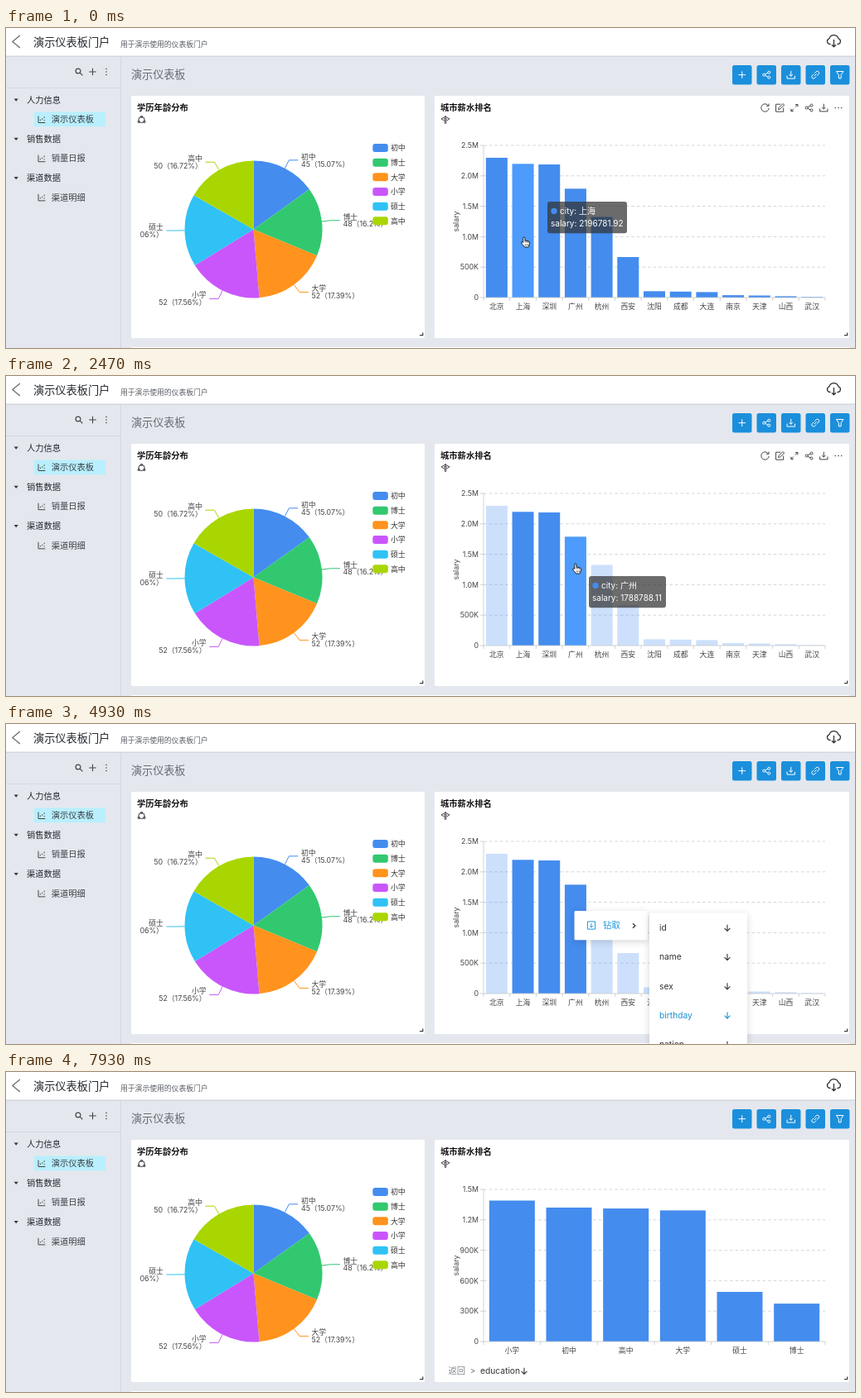
These frames come from a looping animation (1024 px wide and 387 px high, 7990 ms). An HTML page:

```html
<!DOCTYPE html>
<html lang="zh">
<head>
<meta charset="utf-8">
<title>演示仪表板</title>
<style>
html, body { margin: 0; width: 100%; height: 100%; overflow: hidden; background: #e4e8ee; }
svg { display: block; width: 1024px; height: 387px; font-family: Inter, "Noto Sans CJK SC", "Noto Sans CJK", sans-serif; }
.shadow { filter: drop-shadow(0 2px 4px rgba(0, 0, 0, .16)); }
</style>
</head>
<body>
<svg id="stage" viewBox="0 0 1024 387" xmlns="http://www.w3.org/2000/svg"></svg>
<script>
const LOOP = 7990, STEPS = 120;
const BLUE = '#448cee', BRIGHT = '#4c9bfd', INK = '#23272e', GREY = '#555a61', LINK = '#1a90cf';
const AXIS = { left: 576, right: 988, top: 142, base: 326 };
const CLICKS = { 1: 370, 2: 1250, 3: 2300 };
const MENU_OPEN = 3700, SUB_OPEN = 3930, MENU_CLOSE = 5680, DRILL = 5750;

// ---- markup helpers; text is placed by its vertical middle
const rect = (x, y, w, h, fill, extra = '') =>
  `<rect x="${x}" y="${y}" width="${w}" height="${h}" fill="${fill}" ${extra}/>`;
const line = (d, color, w = 1, extra = '') =>
  `<path d="${d}" fill="none" stroke="${color}" stroke-width="${w}" ${extra}/>`;
const text = (x, y, s, size = 10.25, fill = INK, extra = '') =>
  `<text x="${x}" y="${y + size * .36}" font-size="${size}" fill="${fill}" ${extra}>${s}</text>`;
const icon = (x, y, name, color = '#3b3f45', w = 1) =>
  line(ICONS[name], color, w, `transform="translate(${x} ${y})" stroke-linejoin="round"`);
const group = (id, body, extra = '') => `<g id="${id}" ${extra}>${body}</g>`;
const MIDDLE = 'text-anchor="middle"', END = 'text-anchor="end"', BOLD = 'font-weight="600"';

const ring = (x, y, r) => `M${x - r} ${y}a${r} ${r} 0 1 0 ${2 * r} 0a${r} ${r} 0 1 0 ${-2 * r} 0`;
const ICONS = {
  back: 'M4.5-7.5L-4.5 0L4.5 7.5',
  cloud: 'M-4 4H-5a3.4 3.4 0 0 1-.6-6.6a5.8 5.8 0 0 1 11.2 0a3.4 3.4 0 0 1-.6 6.6H4M0-1.5V7M-2.5 4.7L0 7.2L2.5 4.7',
  search: ring(-1, -1, 2.9) + 'M1.2 1.2L4.3 4.3',
  plus: 'M-4.3 0H4.3M0-4.3V4.3',
  share: ring(-3, 0, 1.5) + ring(3, -3, 1.5) + ring(3, 3, 1.5) + 'M-1.6-.7L1.6-2.4M-1.6 .7L1.6 2.4',
  download: 'M-4.7 1V4.4H4.7V1M0-4.8V1.6M-2.2-.6L0 1.6L2.2-.6',
  link: 'M-1-2L.8-3.8a2.1 2.1 0 0 1 3 3L2 1M1 2L-.8 3.8a2.1 2.1 0 0 1-3-3L-2-1M-1.4 1.4L1.4-1.4',
  filter: 'M-4.2-4.2H4.2L1.4 0V4.2H-1.4V0Z',
  chart: 'M-4-4V4H4.4M-1.6 1.6v-1.6M.8 .4v-1.6M3.2-1.6v-1.6M3.2 1.8v-1.2',
  refresh: 'M4-2.5A4.7 4.7 0 1 0 4.7 .5M4.5-5V-2.2H1.6',
  edit: 'M1-4.3H-4.6V4.7H4.5V0M-1.6 2L-1.2 0L3.8-5L5.4-3.4L.4 1.6Z',
  expand: 'M1-1L4-4M1.2-4H4V-1.2M-1 1L-4 4M-4 1.2V4H-1.2',
  arrow: 'M0-3.8V3.6M-3.4 .4L0 3.8L3.4 .4',
  chevron: 'M-1.5-2.8L1.5 0L-1.5 2.8',
  drill: 'M-4.6-4.6H4.6V4.6H-4.6ZM0-2.4V2.2M-1.8 .6L0 2.4L1.8 .6',
  ring: ring(0, 0, 3.6) + ring(0, -3.6, 1.1) + ring(-3.4, 2.4, 1.1) + ring(3.4, 2.4, 1.1),
  cross: 'M-5-.6L0-3.4L5-.6L0 2.4ZM0-4.6V5M-2-.6H2M-1.6 3.6L0 5L1.6 3.6'
};

// ---- static page
function page() {
  let s = rect(0, 0, 1024, 387, '#e4e8ee');
  s += rect(0, 33, 1024, 2, '#d3d7dd') + rect(0, 0, 1024, 33.5, '#fff');
  s += icon(12.3, 16.5, 'back', '#666', 1.1) + text(33, 17.5, '演示仪表板门户', 13.2)
    + text(138, 19.5, '用于演示使用的仪表板门户', 8.8, GREY) + icon(998.5, 15.5, 'cloud', '#333', 1.3);

  s += rect(138, 35, 1, 352, '#d3d8df') + rect(0, 72, 138, 1, '#d3d8df');
  s += icon(88, 53, 'search', '#444', 1.2) + icon(104.5, 53, 'plus', '#444', 1.1);
  for (const y of [49.5, 53, 56.5]) s += `<circle cx="121" cy="${y}" r=".8" fill="#444"/>`;
  s += rect(34, 101.5, 86, 17.7, '#b9effe');
  [['人力信息', '演示仪表板'], ['销售数据', '销量日报'], ['渠道数据', '渠道明细']].forEach(([head, item], i) => {
    const y = 87 + i * 47.2;
    s += `<path d="M9.6 ${y - 1.4}h5.2l-2.6 3.2z" fill="#333"/>`
      + text(25, y, head, 10.25, INK, 'font-weight="500"')
      + icon(43, y + 23.5, 'chart', '#444') + text(54.7, y + 23.5, item, 10.25, '#3a3f46');
  });

  s += text(151, 56.5, '演示仪表板', 13.1, '#666b73');
  ['plus', 'share', 'download', 'link', 'filter'].forEach((name, i) => {
    const x = 876 + i * 29.5;
    s += rect(x, 45, 23.5, 23.5, '#1b8fdc', 'rx="2.5"') + icon(x + 11.75, 56.7, name, '#fff');
  });

  for (const [x, w] of [[151, 354], [517, 500]]) {
    s += rect(x, 82, w, 293, '#fff', 'rx="2"')
      + line(`M${x + w - 2.3} 368.5V371.6H${x + w - 6}`, '#444', 1.3);
  }
  s += rect(151, 386, 866, 1, '#fff');
  s += text(158, 96.5, '学历年龄分布', 10.3, '#111', BOLD) + icon(163.5, 111, 'ring', '#333');
  s += text(524, 96.5, '城市薪水排名', 10.3, '#111', BOLD) + icon(530, 110.5, 'cross', '#333', .9);
  return s;
}

function pie() {
  const cx = 298.5, cy = 243.5, r = 83;
  const parts = [
    ['初中', 45, 15.07, BLUE], ['博士', 48, 16.2, '#32c870'], ['大学', 52, 17.39, '#ff931e'],
    ['小学', 52, 17.56, '#c956fb'], ['硕士', 51, 17.06, '#30c2f5'], ['高中', 50, 16.72, '#a9d600']
  ];
  const polar = (p, d) => [cx + d * Math.sin(p * Math.PI / 50), cy - d * Math.cos(p * Math.PI / 50)];
  let sum = 0, slices = '', labels = '', legend = '';
  parts.forEach(([name, count, share, color], i) => {
    const mid = sum + share / 2, side = mid < 50 ? 1 : -1;
    const [x, y] = polar(mid, r + 11), end = x + side * 11;
    slices += `<path d="M${cx} ${cy}L${polar(sum, r)}A${r} ${r} 0 0 1 ${polar(sum + share, r)}Z" fill="${color}"/>`;
    labels += line(`M${polar(mid, r)}L${x} ${y}H${end}`, color);
    [name, `${count}（${share}%）`].forEach((s, row) => {
      labels += text(end + side * 3.6, y - 4.3 + row * 8.8, s, 8.8, '#444', side < 0 ? END : '');
    });
    const ly = 145 + i * 17.66;
    legend += rect(442.3, ly - 5, 18.5, 10, color, 'rx="3"') + text(464, ly, name, 8.9, '#333');
    sum += share;
  });
  return `<clipPath id="card"><rect x="162" y="120" width="340" height="250"/></clipPath>`
    + `<g clip-path="url(#card)">${slices}${labels}${legend}</g>`;
}

// ---- bar charts
const cities = {
  id: 'cities', max: 2500, width: 26, ticks: ['0', '500K', '1.0M', '1.5M', '2.0M', '2.5M'],
  names: '北京 上海 深圳 广州 杭州 西安 沈阳 成都 大连 南京 天津 山西 武汉'.split(' '),
  values: [2297, 2197, 2187, 1789, 1325, 666, 104, 98, 90, 39, 34, 22, 9]
};
const degrees = {
  id: 'degrees', max: 1500, width: 55, ticks: ['0', '300K', '600K', '900K', '1.2M', '1.5M'],
  names: '小学 初中 高中 大学 硕士 博士'.split(' '),
  values: [1390, 1321, 1312, 1293, 490, 374]
};

function barChart({ id, max, width, ticks, names, values }) {
  const { left, right, top, base } = AXIS, pitch = (right - left) / names.length;
  let s = '', bars = '', marks = '';
  ticks.forEach((label, i) => {
    const y = base - i * (base - top) / 5;
    if (i) s += line(`M${left} ${y}H${right}`, '#cfd2d6', .9, 'stroke-dasharray="3.6 3"');
    marks += `M${left - 4} ${y}H${left}`;
    s += text(570, y, label, 8.8, '#444', END);
  });
  names.forEach((name, i) => {
    const x = left + pitch * (i + .5), h = values[i] / max * (base - top);
    bars += rect(x - width / 2, base - h, width, h, BLUE);
    marks += `M${left + pitch * i} ${base}v4`;
    s += text(x, 336.5, name, 8.8, '#444', MIDDLE);
  });
  marks += `M${right} ${base}v4M${left} ${top}V${base}H${right}`;
  s += group(id + 'Bars', bars) + line(marks, '#c4c8cd', .8);
  s += text(0, 0, 'salary', 8.8, '#444', `${MIDDLE} transform="translate(543 234) rotate(-90)"`);
  return group(id, s);
}

const crumbs = () => group('crumbs', text(533.5, 361.5, '返回', 10.25, '#80858c')
  + text(560, 361.5, '&gt;', 9.5, '#666') + text(572, 361.5, 'education', 10.25, '#333')
  + icon(625, 361.5, 'arrow', '#333', 1.1));

// ---- overlays
function tools() {
  let s = '';
  ['refresh', 'edit', 'expand', 'share', 'download'].forEach((name, i) => {
    s += icon(915.5 + i * 17.7, 96.5, name, '#444');
  });
  for (const x of [1000.3, 1004, 1007.7]) s += `<circle cx="${x}" cy="96.5" r=".8" fill="#444"/>`;
  return group('tools', s);
}

const tooltip = () => group('tip',
  rect(0, 0, 96, 38.3, 'rgba(50,50,50,.72)', 'rx="3" id="tipBox"')
  + `<circle cx="8" cy="11.4" r="3.7" fill="${BLUE}"/>`
  + text(15, 11.4, '', 10, '#fff', 'id="tipCity"') + text(4, 26.8, '', 10, '#fff', 'id="tipPay"'));

const FIELDS = ['id', 'name', 'sex', 'birthday', 'nation'];
function menus() {
  const drill = rect(685.5, 226, 88.5, 35.3, '#fff', 'rx="1.5" class="shadow"')
    + group('drillItem', icon(706, 243.5, 'drill', 'currentColor') + text(720, 243.7, '钻取', 10.4, 'currentColor'))
    + icon(757.5, 244, 'chevron', '#333', 1.2);
  let sub = rect(776, 228.5, 118, 190, '#fff', 'rx="1.5" class="shadow"');
  FIELDS.forEach((name, i) => {
    const y = 246.5 + i * 35.25;
    sub += group('field' + i, text(788, y, name, 10.25, 'currentColor') + icon(870, y, 'arrow', 'currentColor', 1.1));
  });
  return group('menu', drill) + group('submenu', sub);
}

const hand = () => group('hand',
  `<path d="M-1.2 6.3V1a1.1 1.1 0 0 1 2.2 0V4l4 .8q1.8.4 1.5 2.2l-.6 3q-.3 1.4-.8 2H.6q-2-2.6-4-5q-.2-1.6 1.2-1.3z" fill="#fff" stroke="#111" stroke-width=".9" stroke-linejoin="round"/>`
  + line('M1 4.2V6.6M2.8 4.6V6.8M4.6 5V7M1.2 8.4v2M2.8 8.4v2M4.4 8.4v2', '#111', .6));

document.getElementById('stage').innerHTML = page() + pie() + barChart(cities) + barChart(degrees)
  + crumbs() + tools() + tooltip() + menus() + hand();

// ---- timeline
const $ = id => document.getElementById(id);
const show = (id, on) => $(id).style.display = on ? '' : 'none';
const ramp = (t, start, dur) => Math.min(1, Math.max(0, (t - start) / dur));
const easeOut = u => 1 - (1 - u) ** 3;
const easeInOut = u => u * u * (3 - 2 * u);

const HAND = [[0, 625, 253], [590, 625, 253], [820, 656, 231], [1540, 656, 231], [1720, 687, 227],
  [2600, 687, 227], [2900, 685, 229], [3450, 685, 229], [3650, 685, 226]];
const TIP = [[0, 653, 210], [400, 641, 267], [730, 641, 267], [1130, 672, 246], [1670, 672, 246],
  [2070, 703, 242], [2600, 703, 242], [3000, 701, 244], [3450, 701, 244], [3700, 701, 241]];
const HOVERS = [
  { from: 0, bar: 1, city: '上海', pay: '2196781.92', width: 96 },
  { from: 730, bar: 2, city: '深圳', pay: '2186530.88', width: 98.5 },
  { from: 1665, bar: 3, city: '广州', pay: '1788788.11', width: 93 }
];
const FIELD_TIMES = [4130, 4330, 4530, 4730, 5130, 5300];

function place(id, keys, t, ease) {
  const n = keys.findIndex(k => k[0] > t);
  const b = keys[n < 0 ? keys.length - 1 : n], a = n < 0 ? b : keys[n - 1];
  const u = a === b ? 0 : ease((t - a[0]) / (b[0] - a[0]));
  $(id).setAttribute('transform', `translate(${a[1] + (b[1] - a[1]) * u} ${a[2] + (b[2] - a[2]) * u})`);
}

function draw(t) {
  const pointing = t < MENU_OPEN, drilled = t >= DRILL;
  const hover = HOVERS.filter(h => t >= h.from).pop();
  const faded = ramp(t, CLICKS[1], 150);

  show('cities', !drilled);
  show('degrees', drilled);
  show('crumbs', drilled);
  show('tools', pointing);
  show('hand', pointing);
  show('tip', pointing);
  show('menu', t >= MENU_OPEN && t < MENU_CLOSE);
  show('submenu', t >= SUB_OPEN && t < MENU_CLOSE);

  [...$('citiesBars').children].forEach((bar, i) => {
    const picked = i === 1 ? 1 : i in CLICKS ? ramp(t, CLICKS[i], 150) : 0;
    const lit = pointing && hover.bar === i && (picked > 0 && (i === 1 || t >= CLICKS[i]));
    bar.setAttribute('fill', lit ? BRIGHT : BLUE);
    bar.setAttribute('fill-opacity', 1 - .73 * faded * (1 - picked));
  });

  const grow = easeOut(ramp(t, DRILL, 300));
  $('degreesBars').setAttribute('transform', `translate(0 ${AXIS.base * (1 - grow)}) scale(1 ${grow})`);

  place('hand', HAND, t, easeInOut);
  place('tip', TIP, t, easeOut);
  $('tipBox').setAttribute('width', hover.width);
  $('tipCity').textContent = 'city: ' + hover.city;
  $('tipPay').textContent = 'salary: ' + hover.pay;

  $('drillItem').style.color = t >= MENU_OPEN + 130 ? '#1b96e0' : INK;
  FIELDS.forEach((_, i) => {
    const on = t >= FIELD_TIMES[i] && t < FIELD_TIMES[i + 1];
    $('field' + i).style.color = on ? LINK : '#333';
  });
}

function tick() {
  const step = Math.floor(performance.now() % LOOP / LOOP * STEPS);
  draw(step * LOOP / STEPS);
  requestAnimationFrame(tick);
}
tick();
</script>
</body>
</html>
```
